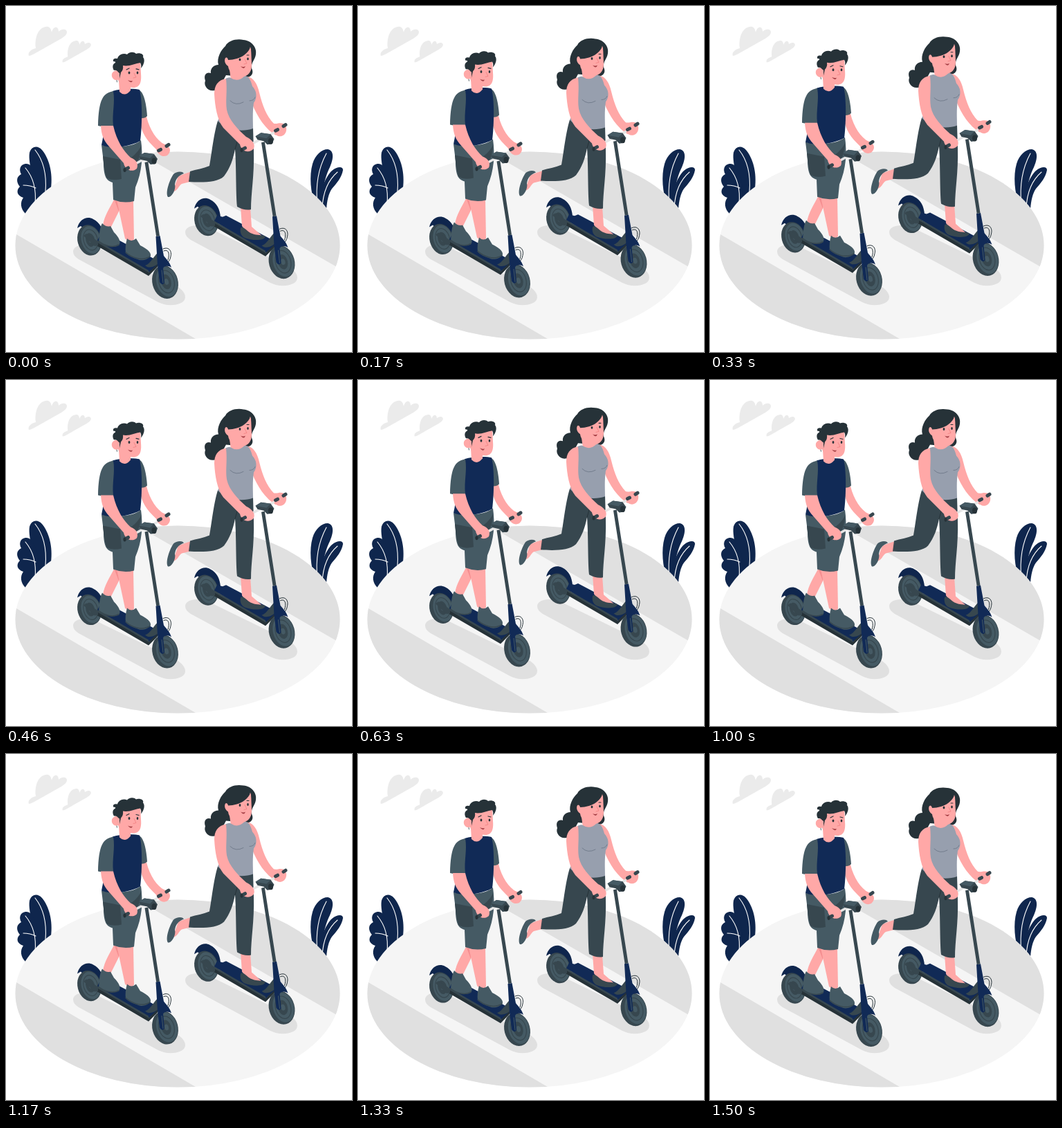
An HTML page for the animation above (1.54 s loop, 500x500 px).

```html
<!DOCTYPE html>
<html lang="en">
<head>
<meta charset="utf-8">
<title>Scooter ride</title>
<style>
  html, body { margin: 0; width: 100%; height: 100%; overflow: hidden; background: #fff; }
  svg { display: block; width: 100vw; height: 100vh; }
  .navy { fill: #112a56; }
  .deep { fill: #0f264d; }
  .ink { fill: #263238; }
  .slate { fill: #37474f; }
  .steel { fill: #455a64; }
  .skin { fill: #ffa8a7; }
  .road { fill: #e0e0e0; }
  .line { fill: none; stroke-linecap: round; stroke-linejoin: round; }
</style>
</head>
<body>
<svg viewBox="0 0 500 500">
  <defs>
    <clipPath id="disc"><ellipse cx="248" cy="346" rx="234.5" ry="135.5"/></clipPath>
    <path id="cloud" fill="#ebebeb" d="M33 72C31 67 36 63 43 61C41 45 47 31 58 30C63 29 65 33 66 38C68 29 76 28 76 37C79 33 88 32 88 38C88 42 83 45 80 47L41 69C37 71 35 72 33 72Z"/>
    <path id="shadow" class="road" d="M97 355C97 345 115 342 130 348L245 404C262 413 262 425 253 429C243 434 230 433 220 428L105 366Q97 361 97 355Z"/>

    <g id="wheel">
      <ellipse class="slate" rx="18.5" ry="24.4"/>
      <ellipse class="steel" cx="2.5" rx="15" ry="22"/>
      <ellipse class="line" cx="2" rx="11" ry="16.5" stroke="#37474f" stroke-width="1.2"/>
      <ellipse class="slate" cx="1.5" rx="7" ry="11"/>
      <ellipse class="steel" cx="2" rx="3" ry="4.5"/>
    </g>

    <g id="board">
      <path class="deep" d="M103 321C106 308 117 303 126 308C136 313 140 322 141 333L134 343L108 318Z"/>
      <use href="#wheel" transform="translate(120.500 338.500) rotate(-15) scale(.92)"/>
      <path class="navy" d="M132 339L136 331L144 333L149 331L221 369L218 377L206 385Z"/>
      <path class="slate" d="M132 339L206 382V386L132 344Z"/>
      <path class="ink" d="M132 342L206 385L219 373V377L206 390L132 347Z"/>
      <path class="slate" d="M112 332L116 329L133 340V346L128 347Z"/>
    </g>

    <g id="steering">
      <use href="#wheel" transform="translate(230 399) rotate(-15)"/>
      <path class="line" d="M227 351C236 347 240 355 238 362Q237 369 232 372M228 354C235 351 237 358 234 367" stroke="#263238" stroke-width="1"/>
      <path class="slate" d="M201 375C209 373 214 360 221 355L224 366C220 375 211 379 204 377Z"/>
      <path class="navy" d="M216.500 333L222.500 332L228 361C232 366 237 371 239 378C235 375 229 375 227 379L229 400Q226 405 222 399L219 375Z"/>
      <path class="line" d="M225 382L227 400" stroke="#455a64" stroke-width="1"/>
      <path class="slate" d="M200.500 226L205.300 225L222 332L217.200 333Z"/>
      <path class="line" d="M176 234L200 221M213 215L224 209" stroke="#e6e6e6" stroke-width="3.500"/>
      <path class="slate" d="M192 217L200 212L214 214L219 221L216 228L209 229L204 224L195 222Z"/>
      <path class="steel" d="M192 217L200 212L214 214L208 220Z"/>
      <ellipse class="ink" cx="214" cy="224" rx="3.500" ry="4.500"/>
    </g>

    <g id="grips">
      <path class="line" d="M172 236.500L176.500 234M220.500 209L223.500 207.500M232 202.500L235 200.500" stroke="#37474f" stroke-width="5"/>
      <ellipse class="ink" cx="171.500" cy="237" rx="2" ry="3"/>
    </g>
  </defs>

  <use href="#cloud"/>
  <use href="#cloud" transform="translate(57.300 27.800) scale(.745)"/>

  <path class="deep" d="M38 287C45 260 31 228 34 212C37 202 46 201 52 208C62 220 68 240 65 264L45 287Z"/>
  <path class="deep" d="M28 300C21 293 20 284 25 277C16 274 14 267 20 261C15 255 14 247 22 243C18 236 21 229 28 228Q35 227 37 234C45 239 50 260 44 290Z"/>
  <path class="deep" d="M447 288C440 270 438 245 443 228C447 215 456 207 465 207C475 209 473 222 468 233C462 245 457 262 456 290Z"/>
  <path class="deep" d="M451 292C453 270 461 247 471 238C478 232 487 231 487 237C485 248 478 256 471 264C466 271 464 282 463 293Z"/>
  <path class="line" stroke="#fff" stroke-width="1.100" d="M42 208C54 223 59 243 57 268M28 234C39 247 44 265 42 286M25 259Q35 259 43 263M463 213C451 235 447 260 450 288M479 240C465 252 458 270 457 292"/>

  <g clip-path="url(#disc)">
    <path fill="#f5f5f5" d="M0 200H500V500H0Z"/>
    <path class="road" d="M15 330L274 481V500H0V321ZM190 211L500 389.700V200H171Z"/>
  </g>
  <use href="#shadow"/>
  <use href="#shadow" x="162" y="-28"/>

  <g id="riders">
    <!-- woman -->
    <use href="#board" x="169" y="-28.300"/>
    <path class="ink" d="M318 100C314 107 312 111 315 117C312 124 304 124 301 122C292 124 285 115 288 108C285 99 290 95 296 97C295 90 300 85 307 85C304 75 311 63 317 58C321 50 333 47 343 49C355 50 363 60 361 70C360 78 354 81 355 90C358 96 356 101 350 103Z"/>
    <path class="skin" d="M266 240C258 242 252 245 249 246L241 268C248 268 249 260 254 257L266 254Z"/>
    <path class="steel" d="M234 276C230 270 236 252 242 243C246 239 255 238 257 242C249 245 245 250 244 258C246 264 240 277 234 276Z"/>
    <path class="skin" d="M339 290L341 318C347 328 362 334 371 333L355 319L353 291Z"/>
    <path class="slate" d="M339 321C342 316 349 327 356 329C363 332 370 330 375 333C373 340 355 339 345 335C339 332 338 326 339 321Z"/>
    <path class="slate" d="M306 166C300 185 297 215 294 231C285 235 275 236 266 239L264 254C280 255 305 256 315 246C324 234 328 222 331 207C333 235 332 270 334 290Q345 296 354 294C354 270 359 245 358 210L357 176Z"/>
    <path class="line" d="M331 207L335 193" stroke="#263238" stroke-width="1"/>
    <path class="skin" d="M349 102C358 104 363 112 366 125C371 145 376 158 387 170L390 187C375 178 363 160 356 142Z"/>
    <path class="skin" d="M323 92L325 107Q337 113 347 103L340 92Z"/>
    <path fill="#979fae" d="M317 105Q323 102 325 104Q335 111 345 101C351 101 354 108 356 116C362 122 364 132 358 140C356 155 357 165 357 177C340 183 318 179 306 166C312 155 319 140 317 122Z"/>
    <path class="line" d="M324 137Q332 145 343 139M352 137Q358 137 360 132" stroke="#737d8d" stroke-width="1"/>
    <path class="skin" d="M321 74C315 72 314 83 321 87C322 95 328 101 341 102C350 102 355 95 355 85L354 59Q335 58 321 74Z"/>
    <path class="ink" d="M321 78C329 78 339 75 344 71Q352 65 353 59Q356 68 356 79C363 71 361 59 354 54C340 46 321 51 315 64L316 75Q320 73 321 78Z"/>
    <g class="ink">
      <ellipse cx="338" cy="77.500" rx="1.400" ry="1.900"/><ellipse cx="349.500" cy="76.500" rx="1.300" ry="1.900"/>
      <path class="line" d="M335 73L339 71M348 71L351 71" stroke="#263238" stroke-width="1.100"/>
    </g>
    <path class="line" d="M345 77L348 83L344 84" stroke="#f07f80" stroke-width=".8"/>
    <path d="M339 87Q343 89 346 87Q344 93 339 87Z" fill="#a53f45"/>
    <use href="#steering" x="168.500" y="-28.800"/>
    <path class="skin" d="M318 105C306 107 301 115 301 127C302 145 305 164 314 176L338 200C340 210 351 214 358 206C361 199 355 193 347 189C335 178 322 165 319 150C317 135 320 125 318 105Z"/>
    <path class="skin" d="M385 169C391 172 394 168 401 170C407 174 406 182 402 186C396 191 390 187 388 184Z"/>
    <use href="#grips" x="169" y="-28.800"/>

    <!-- man -->
    <use href="#board"/>
    <path class="skin" d="M157 278C150 292 142 303 140 317L151 321L163 297L166 279Z"/>
    <path fill="#f58e90" d="M157 281L163 297L167 284Z"/>
    <path class="skin" d="M160 280L172 336Q180 344 185 337L184 281Z"/>
    <path class="steel" d="M134 341C135 330 135 321 139 314Q145 320 151 318L156 327C163 334 167 341 163 346C155 350 143 347 134 341Z"/>
    <path class="steel" d="M173 357C172 350 173 343 175 336Q181 342 188 336L194 346C202 350 210 355 209 361C205 367 195 369 190 366C183 364 177 361 173 357Z"/>
    <path class="line" stroke="#37474f" stroke-width="1.500" d="M134 340C143 347 155 350 163 345M173 356C181 363 196 370 208 362"/>
    <path class="steel" d="M138 201C160 206 185 203 195 194C198 215 197 240 187 262L185 282Q170 286 155 280L154 255C145 252 141 247 141 225Z"/>
    <path class="slate" d="M140 217L165 222L167 250Q155 253 146 249Q142 242 140 217ZM173 224Q188 216 195 203Q194 225 181 239Q184 229 173 224Z"/>
    <path class="skin" d="M193 161C194 178 200 190 212 202L219 209L229 200C218 194 208 180 203 160Z"/>
    <path class="steel" d="M191 121C200 123 203 145 204 159Q200 163 193 162Z"/>
    <path class="navy" d="M154 123C165 119 187 119 193 121C197 135 197 170 194 195C175 205 150 206 138 201L150 140Z"/>
    <path class="skin" d="M163 108L164 124Q172 132 180 122V112Z"/>
    <path class="steel" d="M155 123C140 126 134 135 133 173Q145 176 155 173C153 155 158 140 155 123Z"/>
    <path class="skin" d="M163 94C155 91 149 100 156 106Q159 108 162 106C163 114 171 117 184 118C194 118 196 109 195 98L194 79L168 82Z"/>
    <path class="ink" d="M161 111Q157 106 164 105L166 96Q170 92 169 86C177 88 187 83 194 82Q196 85 195 90C200 84 201 77 198 74C200 69 192 67 188 69C184 65 177 67 175 70C169 67 162 71 161 76Q154 75 155 80Q159 80 158 82C153 84 154 90 156 93C163 92 165 100 160 105Z"/>
    <path class="skin" d="M164 97C157 91 149 98 155 105Q160 109 164 105Z"/>
    <g class="ink">
      <ellipse cx="178" cy="96.500" rx="1.400" ry="2"/><ellipse cx="190" cy="96.500" rx="1.300" ry="2"/>
      <path class="line" d="M174 92L178 90M188 91L192 92" stroke="#263238" stroke-width="1.200"/>
    </g>
    <path class="line" d="M185 97L188 103L184 104" stroke="#f07f80" stroke-width=".8"/>
    <path d="M176 107Q180 109 183 108Q181 113 176 107Z" fill="#a53f45"/>
    <use href="#steering"/>
    <path class="skin" d="M137 173C138 187 141 194 149 203L170 227C172 237 182 241 189 235C192 228 188 222 180 219C170 210 160 195 155 173Z"/>
    <path class="skin" d="M217 207C218 200 226 197 232 201C239 205 238 212 233 216C227 219 220 216 217 207Z"/>
    <use href="#grips"/>
  </g>
</svg>
<script>
  const riders = document.getElementById("riders");
  const LOOP = 1540, LIFT = 9, LEAD = 40;

  function draw() {
    const phase = 2 * Math.PI * (performance.now() + LEAD) / LOOP;
    const y = LIFT / 2 * (Math.cos(phase) - 1);
    riders.setAttribute("transform", `translate(0 ${y.toFixed(2)})`);
    requestAnimationFrame(draw);
  }
  draw();
</script>
</body>
</html>
```
